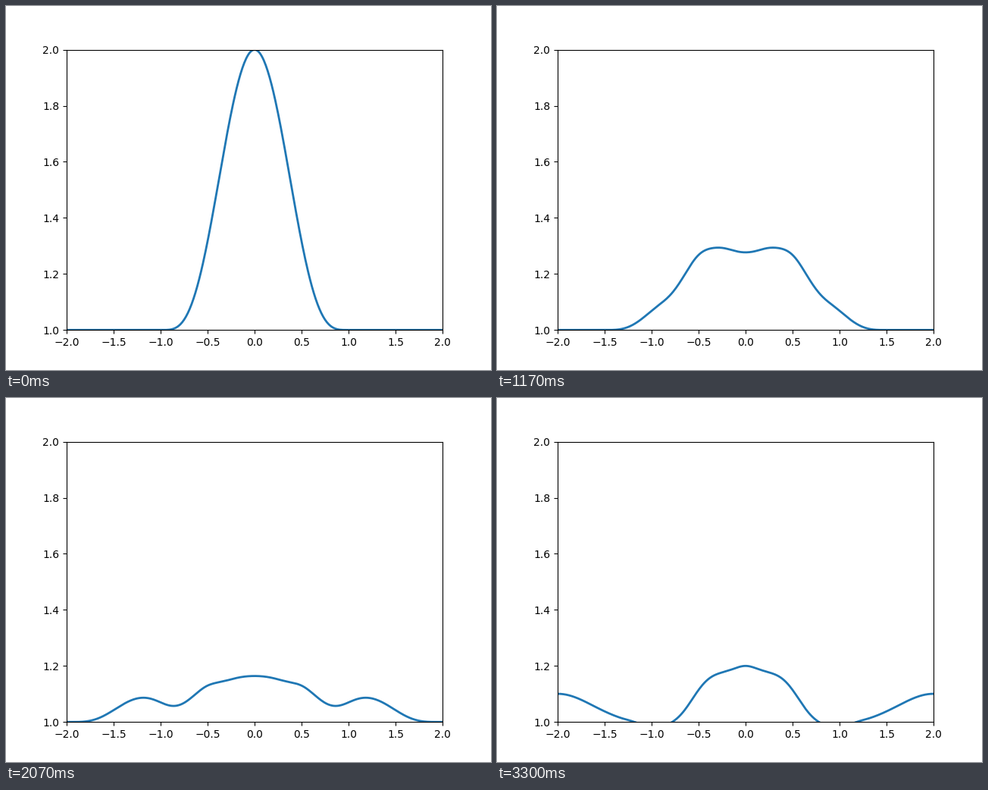
Animation of 640 by 480 pixels, one loop 3.33 s. Source, as a matplotlib script:

```python
import numpy as np
import matplotlib.pyplot as plt
from matplotlib.animation import FuncAnimation

FRAMES = 100
FPS = 60  # simulated steps per time unit

# Key steps for the parts of the pulse that stay near the middle.
KEYS = [0, 14, 35, 52, 62, 76, 99]
SLOW_HEIGHT = [.26, .32, .235, .1765, .135, .065, .063]
SLOW_WIDTH = [1, .85, .625, .66, .67, .63, .45]
CORE_HEIGHT = [.14, .16, .18, .0755, .132, .20, .20]
CORE_WIDTH = [1, .70, .54, .47, .55, .84, .95]


def ease(values, step):
    """Smooth cubic path through the key values, starting at rest."""
    keys, values = np.array(KEYS, float), np.array(values, float)
    slopes = np.gradient(values, keys)
    slopes[0] = 0
    i = min(np.searchsorted(keys, step, side="right"), len(keys) - 1) - 1
    h = keys[i + 1] - keys[i]
    s = (step - keys[i]) / h
    return ((1 + 2 * s) * (1 - s) ** 2 * values[i]
            + s * (1 - s) ** 2 * h * slopes[i]
            + s ** 2 * (3 - 2 * s) * values[i + 1]
            + s ** 2 * (s - 1) * h * slopes[i + 1])


def bump(x, center, width):
    return np.maximum(1 - ((x - center) / width) ** 2, 0) ** 4


def pair(x, center, width):
    return bump(x, center, width) + bump(x, -center, width)


def surface(x, step):
    t = step / FPS

    # Outgoing crests and their echo from the walls at |x| = 2.
    crest = t + 0.15 * np.tanh(t / 0.2)
    width = 0.77 + 0.23 * np.exp(-(t / 0.17) ** 2) + 0.011 * t ** 4
    height = 0.17 / (1 + 0.93 * t ** 1.2)
    fast = height * (pair(x, crest, width) + pair(x, 4 - crest, width))

    # Slow shoulders, the core between them, and the late trough outside.
    shoulder = 0.45 * np.tanh(t / 0.54)
    slow = ease(SLOW_HEIGHT, step) * pair(x, shoulder, ease(SLOW_WIDTH, step))
    core = ease(CORE_HEIGHT, step) * bump(x, 0, ease(CORE_WIDTH, step))
    trough = 0.08 * max(t - 1.4, 0) * pair(x, 0.97, 0.35)

    return 1 + fast + slow + core - trough


x = np.linspace(-2, 2, 401)
fig, ax = plt.subplots(figsize=(6.4, 4.8), dpi=100)
ax.set_xlim(-2, 2)
ax.set_ylim(1, 2)
line, = ax.plot(x, surface(x, 0), lw=2, color="#1f77b4")


def update(step):
    line.set_ydata(surface(x, step))
    return line,


anim = FuncAnimation(fig, update, frames=FRAMES, interval=33.3,
                     repeat=True, repeat_delay=0)
plt.show()
```
